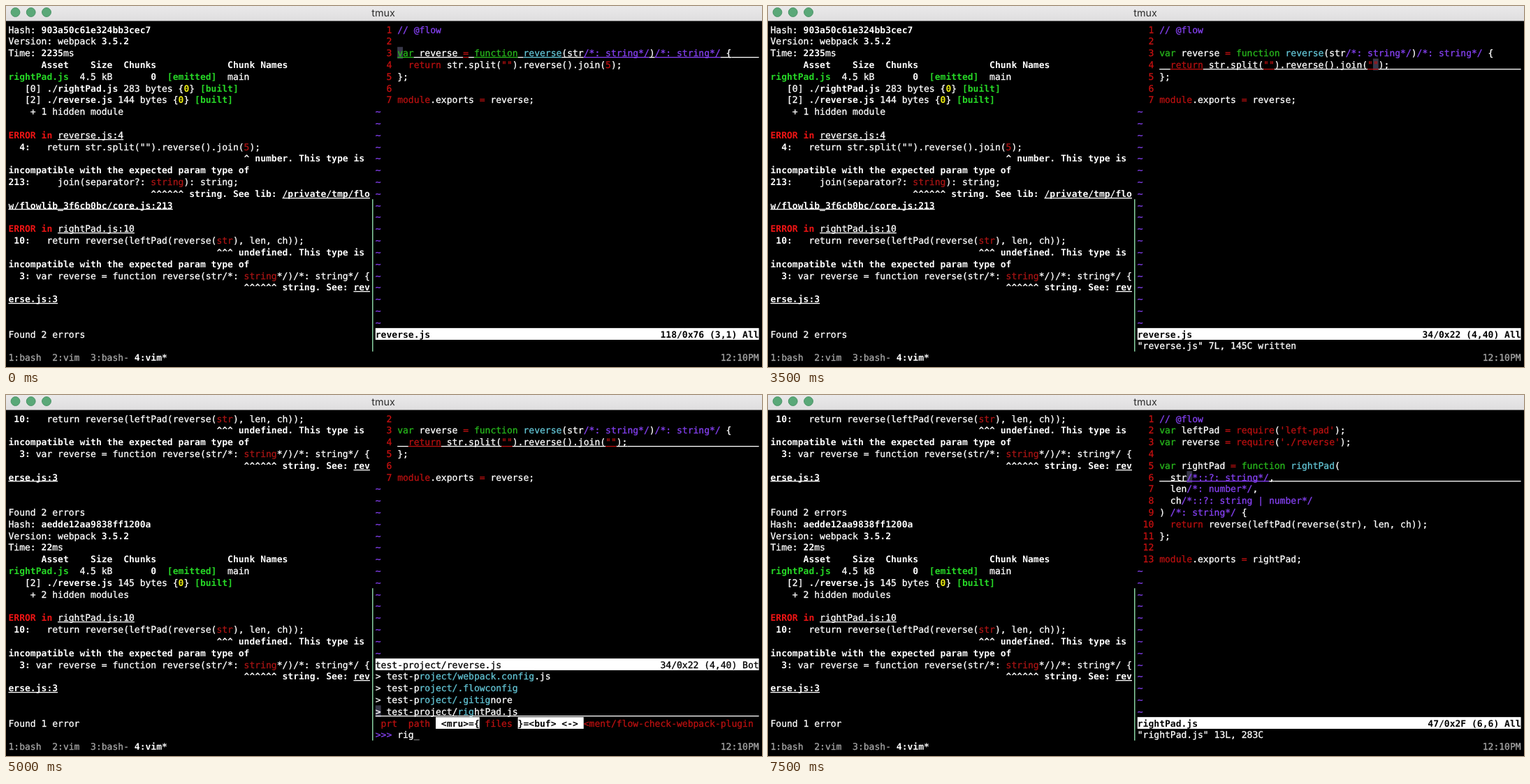
An HTML page with a canvas for the animation above (8 s loop, 1082 by 518 pixels).

```html
<!DOCTYPE html>
<html lang="en">
<head>
<meta charset="utf-8">
<title>tmux</title>
<style>
  html, body { margin: 0; width: 100%; height: 100%; overflow: hidden; background: #000; }
  canvas { display: block; }
</style>
</head>
<body>
<canvas id="stage" width="1082" height="518"></canvas>
<script>
const ctx = document.getElementById('stage').getContext('2d');
const CW = 7.84, RH = 16.81, X0 = 3.5, Y0 = 25.1;
const PANE = 67, PANE_W = 70, CODE = PANE + 4;
const STEP = 500, LOOP = 8000;
const MONO = '13.02px "DejaVu Sans Mono", monospace';

const WHITE = '#fff', RED = '#b81010', PURPLE = '#8440f0', CYAN = '#62c3d3',
      GREEN = '#27b51c', GRAY = '#a6a6a6', CURSOR = '#38384a';

// Style letters of the left pane: [colour, bold, underline]
const STYLES = {
  w: [WHITE], W: [WHITE, 1], u: [WHITE, 0, 1], U: [WHITE, 1, 1],
  r: ['#a81414'], R: ['#f01414', 1], G: ['#26d826', 1], Y: ['#eeee10', 1]
};

const xOf = col => X0 + col * CW;
const yOf = row => Y0 + row * RH;

function box(col, row, n, color) {
  ctx.fillStyle = color;
  ctx.fillRect(xOf(col), yOf(row), n * CW, RH);
}

function rule(col, row, n, color) {
  ctx.fillStyle = color;
  ctx.fillRect(xOf(col), Math.round(yOf(row) + 14.2), n * CW, 1.3);
}

function text(s, col, row, color = WHITE, bold = 0, underline = 0) {
  if (underline) rule(col, row, s.length, color);
  ctx.font = (bold ? 'bold ' : '') + MONO;
  ctx.fillStyle = ctx.strokeStyle = color;
  const y = Math.round(yOf(row) + 13.4);
  [...s].forEach((ch, i) => {
    if (ch === ' ') return;
    ctx.fillText(ch, xOf(col + i), y);
    // a hairline outline gives regular text its fuller weight
    if (!bold) ctx.strokeText(ch, xOf(col + i), y);
  });
  return col + s.length;
}

// "¦" plus a style letter starts a new run
function styled(line, row) {
  let col = 0;
  for (const run of line.split('¦').slice(1)) col = text(run.slice(1), col, row, ...STYLES[run[0]]);
}

const padError = `¦W 10:¦w   return reverse(leftPad(reverse(¦rstr¦w), len, ch));
¦W${' '.repeat(38)}^^^ undefined. This type is
¦Wincompatible with the expected param type of
¦W  3:¦w var reverse = function reverse(str/*: ¦rstring¦w*/)/*: string*/ {
¦W${' '.repeat(43)}^^^^^^ string. See: ¦Urev
¦Uerse.js:3

`;
const summary = (hash, ms) => `¦wHash: ¦W${hash}
¦wVersion: webpack ¦W3.5.2
¦wTime: ¦W${ms}¦wms
¦W      Asset    Size  Chunks             Chunk Names
¦GrightPad.js¦w  4.5 kB       ¦W0  ¦G[emitted]¦w  main
`;
const built = (i, file, size) => `¦w   [${i}] ¦W./${file}¦w ${size} bytes {¦Y0¦w} ¦G[built]\n`;
const errorIn = place => `\n¦RERROR in ¦u${place}\n`;

const firstBuild = summary('903a50c61e324bb3cec7', 2235) +
  built(0, 'rightPad.js', 283) + built(2, 'reverse.js', 144) +
  '¦w    + 1 hidden module\n' + errorIn('reverse.js:4') +
`¦W  4:¦w   return str.split("").reverse().join(¦r5¦w);
¦W${' '.repeat(43)}^ number. This type is
¦Wincompatible with the expected param type of
¦W213:¦w     join(separator?: ¦rstring¦w): string;
¦W${' '.repeat(26)}^^^^^^ string. See lib: ¦U/private/tmp/flo
¦Uw/flowlib_3f6cb0bc/core.js:213
` + errorIn('rightPad.js:10') + padError + '\n¦wFound 2 errors';

const secondBuild = padError + '\n¦wFound 2 errors\n' + summary('aedde12aa9838ff1200a', 22) +
  built(2, 'reverse.js', 145) + '¦w    + 2 hidden modules\n' +
  errorIn('rightPad.js:10') + padError + '\n¦wFound 1 error';

const reverseJs = arg => `// @flow

var reverse = function reverse(str/*: string*/)/*: string*/ {
  return str.split("").reverse().join(${arg});
};

module.exports = reverse;`;

const rightPadJs = `// @flow
var leftPad = require('left-pad');
var reverse = require('./reverse');

var rightPad = function rightPad(
  str/*::?: string*/,
  len/*: number*/,
  ch/*::?: string | number*/
) /*: string*/ {
  return reverse(leftPad(reverse(str), len, ch));
};

module.exports = rightPad;`;

const files = ['LICENSE', 'README.md', 'package.json', 'src/index.js', 'test-project/index.js',
  'test-project/package.json', 'test-project/webpack.config.js', 'test-project/.flowconfig',
  'test-project/.gitignore', 'test-project/rightPad.js'];

const five = reverseJs('5'), quoted = reverseJs('""');
const insert = '-- INSERT --', written = '"reverse.js" 7L, 145C written';
const rev = { name: 'reverse.js' };
const pad = { name: 'rightPad.js', code: rightPadJs, msg: '"rightPad.js" 13L, 283C' };

// One state per half second; "at" is the cursor's line and column
const states = [
  { ...rev, code: five, at: [3, 1] },
  { ...rev, code: five, at: [3, 39] },
  { ...rev, code: five, at: [4, 39] },
  { ...rev, code: reverseJs(''), at: [4, 39], changed: 1, msg: insert },
  { ...rev, code: quoted, at: [4, 41], changed: 1, msg: insert },
  { ...rev, code: quoted, at: [4, 40], changed: 1 },
  { ...rev, code: quoted, at: [4, 40], changed: 1, msg: ':w', noCursor: 1 },
  { ...rev, code: quoted, at: [4, 40], msg: written },
  { ...rev, code: quoted, at: [4, 40], msg: written },
  { ...rev, code: quoted, at: [4, 40], typed: '', list: files },
  { ...rev, code: quoted, at: [4, 40], typed: 'rig', list: files.slice(-4) },
  { ...pad, at: [2, 1] },
  { ...pad, at: [2, 1] },
  { ...pad, at: [5, 1], noCursor: 1 },
  { ...pad, at: [6, 1] },
  { ...pad, at: [6, 6] }
];

const TOKENS = /\/\/.*|\/\*.*?\*\/|"[^"]*"|'[^']*'|(?<=function )\w+|\b(?:var|function|return|require|module|\d+)\b|=/g;

function tokenColor(t) {
  if (/^\/[/*]/.test(t)) return PURPLE;
  if (/^(var|function)$/.test(t)) return GREEN;
  if (/^(["'=\d]|return$|require$|module$)/.test(t)) return RED;
  return CYAN;
}

function codeLine(line, row, underline) {
  let col = CODE, pos = 0;
  for (const m of line.matchAll(TOKENS)) {
    col = text(line.slice(pos, m.index), col, row, WHITE, 0, underline);
    col = text(m[0], col, row, tokenColor(m[0]), 0, underline);
    pos = m.index + m[0].length;
  }
  col = text(line.slice(pos), col, row, WHITE, 0, underline);
  if (underline) rule(col, row, PANE + PANE_W - col, WHITE);
}

function editor(s) {
  const lines = s.code.split('\n'), [ln, cn] = s.at;
  const top = s.list ? 1 : 0, bar = s.list ? 25 - s.list.length : 26;
  const current = lines[ln - 1], ch = current[cn - 1], row = ln - 1 - top;

  if (!s.list && !s.noCursor) {
    box(CODE + cn - 1, row, 1, CURSOR);
    if (ch === ')') box(CODE + current.lastIndexOf('(', cn), row, 1, '#4cc2de');
  }
  for (let r = 0; r < bar; r++) {
    const i = r + top;
    if (i < lines.length) {
      text(String(i + 1).padStart(3), PANE, r, '#c41010');
      codeLine(lines[i], r, i === ln - 1);
    } else text('~', PANE, r, PURPLE);
  }

  const code = ch.charCodeAt(0);
  const info = `${code}/0x${code.toString(16).toUpperCase()} (${ln},${cn}) ${s.list ? 'Bot' : 'All'}`;
  const title = (s.list ? 'test-project/' : '') + s.name + (s.changed ? ' [+]' : '');
  box(PANE, bar, PANE_W, '#fff');
  text(title, PANE, bar, '#000', !s.list);
  text(info, PANE + PANE_W - info.length, bar, '#000', !s.list);

  if (s.list) finder(s, bar + 1);
  else if (s.msg) text(s.msg, PANE, 27, WHITE, s.msg === insert);
}

function finder(s, first) {
  box(PANE, 25, 1, CURSOR);
  rule(PANE, 25, PANE_W, WHITE);
  s.list.forEach((name, i) => {
    const row = first + i;
    text('> ' + name, PANE, row);
    const hit = s.typed && name.match(/r[^ri]*i[^g]*g/);
    if (hit) {
      const col = PANE + 2 + hit.index;
      box(col, row, hit[0].length, '#000');
      text(hit[0], col, row, CYAN);
      if (row === 25) rule(col, row, hit[0].length, WHITE);
    }
  });
  text(' prt  path', PANE, 26, RED);
  box(PANE + 11, 26, 8, '#fff');
  text('<mru>={', PANE + 12, 26, '#000', 1);
  text('files', PANE + 20, 26, RED);
  box(PANE + 26, 26, 12, '#fff');
  text('}=<buf> <->', PANE + 26, 26, '#000', 1);
  text('<ment/flow-check-webpack-plugin', PANE + 38, 26, RED);
  text('>>>', PANE, 27, PURPLE);
  const end = text(s.typed, CODE, 27);
  text('_', end, 27, GRAY);
}

function titleBar() {
  const shade = ctx.createLinearGradient(0, 0, 0, 22);
  shade.addColorStop(0, '#eae9ea');
  shade.addColorStop(1, '#dfdedf');
  ctx.fillStyle = shade;
  ctx.fillRect(0, 0, 1082, 21.5);
  for (const x of [13.5, 35.7, 58]) {
    ctx.beginPath();
    ctx.arc(x, 9, 6.4, 0, 7);
    ctx.fillStyle = '#5aa878';
    ctx.fill();
    ctx.strokeStyle = '#4a9466';
    ctx.stroke();
  }
  ctx.font = '14.3px Inter, sans-serif';
  ctx.fillStyle = '#2c2c2c';
  ctx.textAlign = 'center';
  ctx.fillText('tmux', 540, 14.5);
  ctx.textAlign = 'left';
}

function draw(index) {
  ctx.fillStyle = '#000';
  ctx.fillRect(0, 0, 1082, 518);
  ctx.textRendering = 'geometricPrecision';
  ctx.lineWidth = 1;
  titleBar();
  ctx.lineWidth = 0.3;
  (index < 8 ? firstBuild : secondBuild).split('\n').forEach(styled);
  ctx.fillStyle = '#86cf9f';
  ctx.fillRect(524, yOf(15), 1.5, 13 * RH);
  editor(states[index]);
  const col = text('1:bash  2:vim  3:bash- ', 0, 28, GRAY);
  text('4:vim*', col, 28, WHITE, 1);
  text('12:10PM', 130, 28, GRAY);
}

const start = performance.now();
function tick() {
  draw(Math.floor((performance.now() - start) % LOOP / STEP));
  requestAnimationFrame(tick);
}
tick();
</script>
</body>
</html>
```
